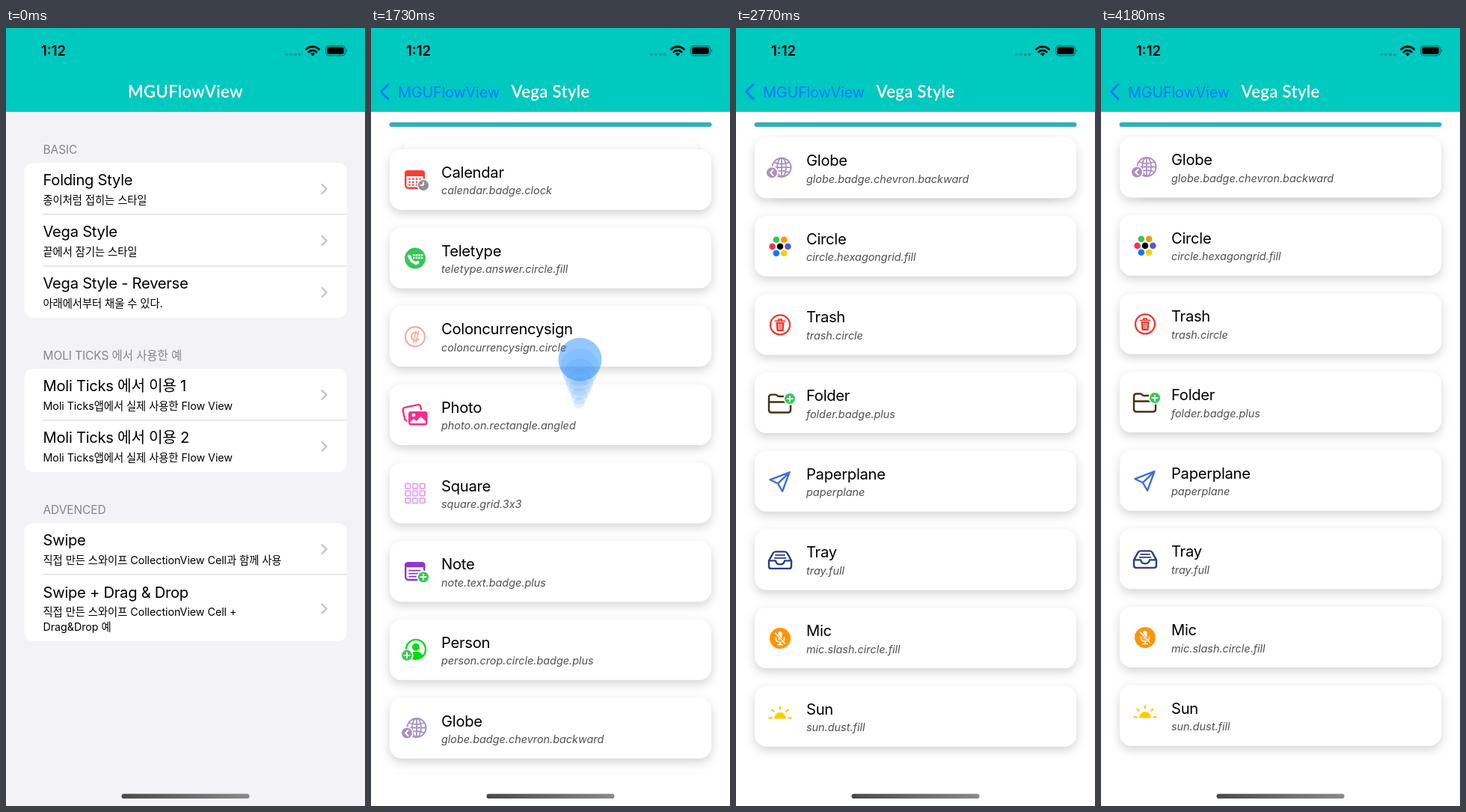
An HTML page that plays this animation: 480x1039 px, repeating every 4230 ms.

```html
<!DOCTYPE html>
<html lang="ko">
<head>
<meta charset="utf-8">
<title>MGUFlowView</title>
<style>
html, body { margin: 0; height: 100%; overflow: hidden; background: #fff }
svg { display: block; width: 100vw; height: 100vh }
text { font-family: Inter, "Noto Sans CJK KR", "Noto Sans CJK", sans-serif; white-space: pre }
.title { font-size: 20.2px; letter-spacing: -.28px }
.sub { font-size: 14.3px; letter-spacing: -.05px }
.name { font-size: 14.4px; font-style: italic; fill: #505050 }
.head { font-size: 15.5px; letter-spacing: -.1px; fill: #85858a }
.nav { font: 600 22px Lato, sans-serif; letter-spacing: .4px; fill: #fff }
.back { font-size: 20px; letter-spacing: -.28px; fill: #007aff }
.line { fill: none; stroke-linecap: round; stroke-linejoin: round }
.card { fill: #fff; filter: drop-shadow(0 5px 6.5px rgba(0,0,0,.17)) }
</style>
</head>
<body>
<svg id="stage" viewBox="0 0 480 1039" preserveAspectRatio="none"></svg>
<script>
const LOOP = 4230, PITCH = 104.65, END = 8 * PITCH, TOP = 145.5;
const clamp = v => Math.max(0, Math.min(1, v));

// ---- drawing helpers
const line = (d, w = 2.4, c = 'currentColor') =>
  `<path class="line" d="${d}" stroke="${c}" stroke-width="${w}"/>`;
const fill = (d, c = 'currentColor') => `<path d="${d}" fill="${c}"/>`;
const dot = (x, y, r, c = 'currentColor') => `<circle cx="${x}" cy="${y}" r="${r}" fill="${c}"/>`;
const ring = (x, y, r, w = 2.3) =>
  `<circle cx="${x}" cy="${y}" r="${r}" fill="none" stroke="currentColor" stroke-width="${w}"/>`;
const box = (x, y, w, h, r, c = 'currentColor', more = '') =>
  `<rect x="${x}" y="${y}" width="${w}" height="${h}" rx="${r}" fill="${c}" ${more}/>`;
const frame = (x, y, w, h, r, s = 2.4) => box(x, y, w, h, r, 'none', `stroke="currentColor" stroke-width="${s}"`);
const text = (cls, x, y, s, more = '') =>
  `<text class="${cls}" x="${x}" y="${y}" ${more}>${s.replace(/&/g, '&amp;')}</text>`;
const badge = (x, y, d, c = '#34c759') => dot(x, y, 8.6, '#fff') + dot(x, y, 7, c) + line(d, 1.8, '#fff');
const plus = (x, y) => badge(x, y, `M${x - 3.7} ${y}h7.4M${x} ${y - 3.7}v7.4`);
const grid = (cols, rows, f) =>
  Array.from({ length: cols * rows }, (_, i) => f(i % cols, Math.floor(i / cols))).join('');

// ---- cards: title, symbol name, colour, 40 x 40 icon
const cards = [
  ['Faceid', 'faceid', '#34c759',
    line('M7 13v-2a4 4 0 0 1 4-4h2M27 7h2a4 4 0 0 1 4 4v2M33 27v2a4 4 0 0 1-4 4h-2M13 33h-2a4 4 0 0 1-4-4v-2', 2.4, '#9be2ae') +
    line('M15 15.5v2.5M25 15.5v2.5M20.5 15.5v6h-1.5M15.5 24.5q4.5 4 9 0', 2)],
  ['Calendar', 'calendar.badge.clock', '#ff3b30',
    frame(7.2, 8.2, 24.6, 22.6, 4) + fill('M6 15v-4q0-4 4-4h19q4 0 4 4v4z') +
    grid(4, 3, (x, y) => dot(12.5 + x * 4.8, 18.8 + y * 4, 1.3)) +
    badge(31, 27, 'M31 23v4h-3.5', '#8e8e93')],
  ['Teletype', 'teletype.answer.circle.fill', '#34c759',
    dot(20, 20, 14) + line('M12.5 17.5q1 6.5 8.5 9', 3.6, '#fff') +
    line('M11.8 17l1.5 2M21 26.5l2.5-1', 4, '#fff') +
    grid(4, 2, (x, y) => box(17 + x * 3.6, 14.5 + y * 3.6, 2.6, 2.6, .8, '#fff'))],
  ['Coloncurrencysign', 'coloncurrencysign.circle', '#f5b09f',
    ring(20, 20, 13) + line('M24.5 16.5a5.4 5.4 0 1 0 0 7', 2.2) + line('M17.5 27.5l3.6-15M21 27.5l3.6-15', 1.5)],
  ['Photo', 'photo.on.rectangle.angled', '#f72d8c',
    `<g transform="rotate(-12 16 16)">${frame(4.5, 8, 24, 18, 3)}</g>` +
    box(9.5, 13.5, 28, 21, 4, '#fff') + box(11, 15, 25.5, 18.5, 3.5) + dot(18, 20, 2.3, '#fff') +
    fill('M13.5 31v-2l4.5-4 3.5 3 6-6 6.5 6v3z', '#fff')],
  ['Square', 'square.grid.3x3', '#e2a9f4', grid(3, 3, (x, y) => frame(7 + x * 9.7, 7 + y * 9.7, 6.6, 6.6, 1.3, 2))],
  ['Note', 'note.text.badge.plus', '#8f35cf',
    frame(7.2, 8.2, 25, 22.6, 4) + fill('M6 14v-3q0-4 4-4h19.5q4 0 4 4v3z') +
    line('M12 18.5h15M12 22.5h15M12 26.5h9', 1.8) + plus(31, 27)],
  ['Person', 'person.crop.circle.badge.plus', '#00dd12',
    ring(21, 19, 13) + dot(21, 16, 5) + fill('M11.5 28q2-6 9.5-6t9.5 6q-4 4-9.5 4t-9.5-4z') + plus(9, 27)],
  ['Globe', 'globe.badge.chevron.backward', '#a990c1',
    ring(22, 19, 12.5, 2) + `<ellipse cx="22" cy="19" rx="6" ry="12.5" fill="none" stroke="currentColor" stroke-width="1.8"/>` +
    line('M22 7v24M10 19h24M12.5 12.5q9.5 4 19 0M12.5 25.5q9.5-4 19 0', 1.8) +
    badge(9, 26, 'M10.5 22.5l-3.5 3.5 3.5 3.5', '#a990c1')],
  ['Circle', 'circle.hexagongrid.fill', '#000',
    dot(20, 20, 4.3) + dot(9.6, 20, 4.3, '#ff2d55') + dot(30.4, 20, 4.3, '#5856d6') +
    dot(14.8, 11, 4.3, '#34c759') + dot(25.2, 11, 4.3, '#ff9500') +
    dot(14.8, 29, 4.3, '#007aff') + dot(25.2, 29, 4.3, '#ffcc00')],
  ['Trash', 'trash.circle', '#f0352c',
    ring(20, 20, 13) + line('M13.5 15h13M18 14.5v-2h4v2', 1.8) + fill('M14.5 16.5h11l-.8 11q-.1 1-1.2 1h-7q-1.1 0-1.2-1z') +
    line('M17.8 18.5l.3 7.5M20 18.5v7.5M22.2 18.5l-.3 7.5', .9, '#fff')],
  ['Folder', 'folder.badge.plus', '#45300f',
    line('M5 18v-6q0-3.5 3.5-3.5h5q1.5 0 2.5 1.2t2.5 1.2h12q3.5 0 3.5 3.5v14.5q0 3.5-3.5 3.5h-22q-3.5 0-3.5-3.5v-10.5h29') + plus(33, 14)],
  ['Paperplane', 'paperplane', '#3f6fd0', line('M32.5 7.5l-26 10 10.5 5 6 10.5zL17 22.5')],
  ['Tray', 'tray.full', '#2b3f80',
    line('M5 21l5.5-10q1-2 3.5-2h12q2.5 0 3.5 2l5.5 10v7.5q0 3-3 3h-24q-3 0-3-3zh9q1 5 6 5t6-5h9') +
    line('M14 13.5h12M12.5 17.5h15', 1.8)],
  ['Mic', 'mic.slash.circle.fill', '#ff9500',
    dot(20, 20, 14) + box(17.4, 11, 5.2, 11.5, 2.6, '#fff') +
    line('M14.5 19v1.5q0 4.5 5.5 4.5t5.5-4.5v-1.5M20 25.5v3M16.8 28.5h6.4', 1.5, '#fff') +
    line('M13.5 13l13 14', 3, '#ff9500') + line('M13.5 13l13 14', 1.4, '#fff')],
  ['Sun', 'sun.dust.fill', '#ffcc00',
    fill('M12 22.8a8 8.5 0 0 1 16 0z') + line('M5.5 21.5h3M31.5 21.5h3M20 7v2.5M9.5 11l2 2M30.5 11l-2 2')]
];
const card = ([title, name, color, icon]) => `<g class="item">${box(25, TOP, 430, 81, 16, '#fff', 'class="card"')}
  <g transform="translate(39 ${TOP + 21})" color="${color}">${icon}</g>
  ${text('title', 94, TOP + 38, title)}${text('name', 94, TOP + 60.5, name)}</g>`;

// ---- first screen
const app = 'Moli Ticks';
const row = (y, title, ...subs) => text('title', 49.5, y + 30, title) +
  subs.map((s, i) => text('sub', 49.5, y + 54.5 + 20 * i, s)).join('') +
  line(`M422.5 ${y + 29 + 10 * (subs.length - 1)}l6 6-6 6`, 2.4, '#c4c4c7');
const rule = y => box(49.5, y - .6, 406, 1.3, 0, '#dcdcdf');
const panel = (y, h) => box(24.5, y, 431, h, 12, '#fff');
const list = box(0, 0, 480, 1039, 0, '#f2f2f7') +
  text('head', 49.5, 167.5, 'BASIC') + panel(180, 207) +
  box(24.5, 249, 431, 69, 0, '#c8c8cd', 'id="press"') + rule(248.7) + rule(317.8) +
  row(180, 'Folding Style', '종이처럼 접히는 스타일') +
  row(249, 'Vega Style', '끝에서 잠기는 스타일') +
  row(318, 'Vega Style - Reverse', '아래에서부터 채울 수 있다.') +
  text('head', 49.5, 442.5, app.toUpperCase() + ' 에서 사용한 예') + panel(455, 138) + rule(523.7) +
  row(455, app + ' 에서 이용 1', app + '앱에서 실제 사용한 Flow View') +
  row(524, app + ' 에서 이용 2', app + '앱에서 실제 사용한 Flow View') +
  text('head', 49.5, 649, 'ADVENCED') + panel(661, 158) + rule(729.7) +
  row(661, 'Swipe', '직접 만든 스와이프 CollectionView Cell과 함께 사용') +
  row(730.5, 'Swipe + Drag & Drop', '직접 만든 스와이프 CollectionView Cell +', 'Drag&Drop 예');

const status = text('', 47, 37, '1:12', 'font-size="18.5" font-weight="600"') +
  [375, 381, 387, 392.5].map(x => dot(x, 35.5, 1.9, 'rgba(0,0,0,.25)')).join('') +
  line('M401.5 28.5a12 12 0 0 1 17 0M404.8 32a7.5 7.5 0 0 1 10.4 0', 2.7, '#000') + fill('M406.8 34.2q3.2-2.4 6.4 0l-3.2 3.4z', '#000') +
  box(427.5, 23.8, 26, 13, 4, 'none', 'stroke="#000" stroke-opacity=".45" stroke-width="1.2"') +
  box(429.3, 25.6, 22.4, 9.4, 2.5, '#000') + fill('M455 28.2q2.5 2.1 0 4.2z', 'rgba(0,0,0,.5)');

const stage = document.getElementById('stage');
stage.innerHTML = `<defs>
  <clipPath id="clip"><path d="M0 112h480v885H0z"/></clipPath>
  <linearGradient id="grip"><stop stop-color="#4a4a4a"/><stop offset="1" stop-color="#8a8a8a"/></linearGradient></defs>
  <g id="list">${list}</g>${box(0, 0, 480, 1039, 0, '#000', 'id="dim"')}
  <g id="flow">${box(0, 112, 480, 927, 0, '#fff')}<g clip-path="url(#clip)">
    ${box(24.5, 126, 431, 6, 3, '#30b0c0', 'id="bar"')}${cards.map(card).join('')}</g></g>
  ${box(0, 0, 480, 112, 0, '#00c9c0')}${status}
  ${text('nav', 240, 93, 'MGUFlowView', 'id="home" text-anchor="middle"')}
  <g id="chevron">${line('M23 75.5l-9.5 9.7 9.5 9.7', 3, '#007aff')}</g>
  ${text('back', 36, 92.5, 'MGUFlowView', 'id="back"')}
  ${text('nav', 240, 93, 'Vega Style', 'id="here" text-anchor="middle"')}
  ${box(154.5, 1022.8, 171, 6.2, 3.1, 'url(#grip)')}<g id="touch"></g>`;
const el = id => document.getElementById(id);
const items = [...document.querySelectorAll('.item')];
const put = (node, x, alpha) => {
  node.setAttribute('transform', `translate(${x} 0)`);
  node.setAttribute('opacity', alpha);
};

// ---- finger paths: [time, x, y], released at the last point
const touches = [
  [[590, 299, 280], [660, 299, 279]],
  [[1270, 277, 541], [1340, 277, 540], [1370, 277, 532], [1500, 278, 510], [1650, 279, 468], [1830, 280, 412],
   [1930, 283, 381], [1965, 284, 368], [1997, 288, 335], [2030, 294, 291], [2130, 308, 61], [2145, 309, 45]],
  [[3000, 283, 463], [3070, 283, 460], [3200, 283, 395], [3265, 283, 368], [3340, 283, 360], [3400, 283, 357], [3540, 283, 357]]
];
function at(path, t) {
  let i = 1;
  while (i < path.length - 1 && path[i][0] < t) i++;
  const [a, b] = [path[i - 1], path[i]], f = clamp((t - a[0]) / (b[0] - a[0]));
  return [a[1] + (b[1] - a[1]) * f, a[2] + (b[2] - a[2]) * f];
}
// The trail keeps only moments at which the finger was moving.
function drawTouch(t) {
  let out = '';
  for (const path of touches) {
    const start = path[0][0], end = path[path.length - 1][0];
    for (let i = 6; i > 0; i--) {
      const past = t - 33 * i, [x, y] = at(path, past);
      const moving = Math.abs(y - at(path, past + 33)[1]) > 1.5;
      if (past >= start && past <= end && moving) out += dot(x, y, 29 - 3.6 * i, 'rgba(0,122,255,.11)');
    }
    const gone = clamp((t - end) / 250);
    if (t >= start && gone < 1) out += dot(...at(path, t), 29 + 32 * gone, `rgba(0,122,255,${.42 * (1 - gone)})`);
  }
  el('touch').innerHTML = out;
}

// ---- scrolling: follow, decay to the end, rubber band, spring back
const settle = x => x > 0 ? (1 + x) * Math.exp(-x) : 1;
function scroll(t) {
  if (t < 3000) {
    const s = Math.max(0, 531 - at(touches[1], t)[1]);
    return t < 2145 ? s : END - (END - s) * Math.exp((2145 - t) / 100);
  }
  const pull = .55 * Math.max(0, 461.6 - at(touches[2], t)[1]);
  return END + pull * 885 / (885 + pull) * settle((t - 3540) * .011);
}

function draw(t) {
  const p = 1 - settle((t - 660) * .0192), s = scroll(t);
  put(el('list'), -144 * p, 1);
  put(el('dim'), 0, .1 * p);
  put(el('flow'), 480 * (1 - p), 1);
  put(el('home'), -117 * p, 1 - p);
  put(el('back'), 137 * (1 - p), p);
  put(el('here'), 310 * (1 - p), p * p);
  put(el('chevron'), 0, clamp(p * 2));
  put(el('press'), 0, t > 620 ? 1 : 0);
  put(el('bar'), 0, clamp(s / 30));
  items.forEach((item, i) => {
    const y = i * PITCH - s, k = Math.max(0, -y / PITCH), scale = 1 - .1 * k;
    const alpha = clamp(1 - .36 * k * k);
    item.setAttribute('display', alpha > 0 && y < 870 ? 'inline' : 'none');
    item.setAttribute('opacity', alpha);
    item.setAttribute('transform',
      `translate(240 ${TOP + 40.5 + Math.max(0, y)}) scale(${scale}) translate(-240 ${-TOP - 40.5})`);
  });
  drawTouch(t);
}

const begin = performance.now();
(function tick() {
  draw((performance.now() - begin) % LOOP);
  requestAnimationFrame(tick);
})();
</script>
</body>
</html>
```
